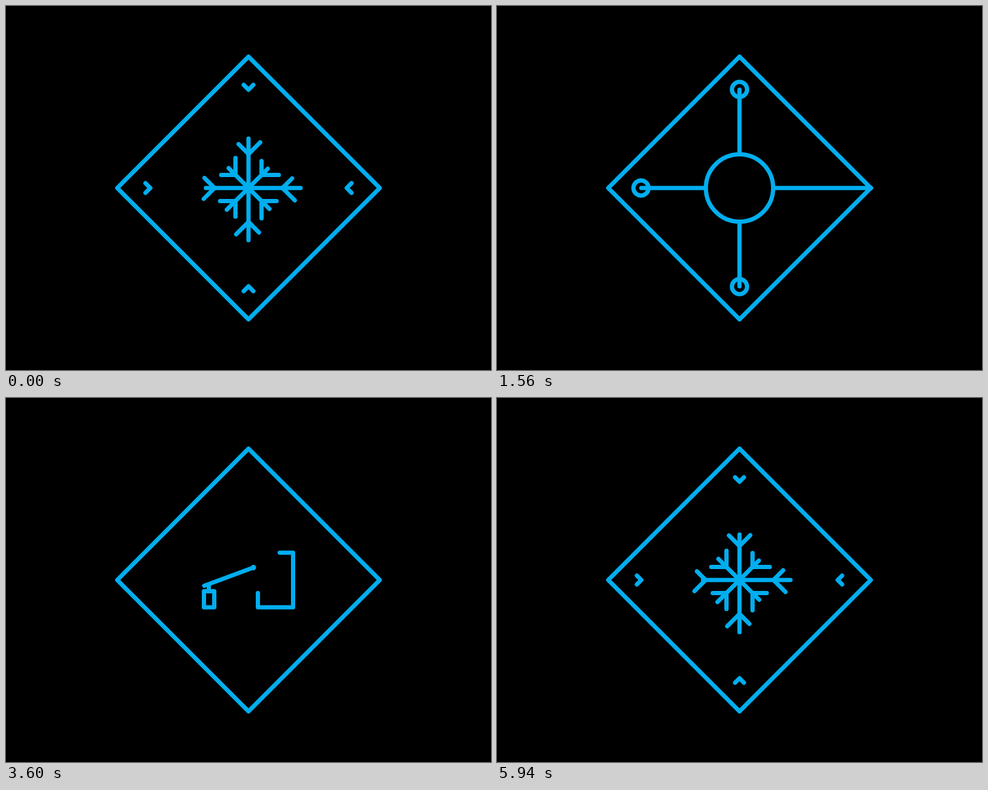
An HTML page with a canvas for the animation above (5970 ms loop, 800 px wide and 600 px high).

```html
<!DOCTYPE html>
<html lang="en">
<head>
<meta charset="utf-8">
<title>Diamond icons</title>
<style>
  html, body { margin: 0; height: 100%; overflow: hidden; background: #000; }
  canvas { display: block; }
</style>
</head>
<body>
<canvas id="stage" width="800" height="600"></canvas>
<script>
const ctx = document.getElementById('stage').getContext('2d');
const LOOP = 5970;

// Sine ease from 0 to 1, starting at `start` and lasting `span` ms
const ease = (t, start, span) => {
  const x = Math.min(1, Math.max(0, (t - start) / span));
  return (1 - Math.cos(Math.PI * x)) / 2;
};

function path(points, closed) {
  ctx.beginPath();
  points.forEach(([x, y]) => ctx.lineTo(x, y));
  if (closed) ctx.closePath();
  ctx.stroke();
}

function ring(x, y, r) {
  if (r < 0.05) return;
  ctx.beginPath();
  ctx.arc(x, y, r, 0, 2 * Math.PI);
  ctx.stroke();
}

// The part of a segment between fractions a and b
function part(x1, y1, x2, y2, a, b) {
  if (b - a < 0.001) return;
  const at = f => [x1 + (x2 - x1) * f, y1 + (y2 - y1) * f];
  path([at(a), at(b)]);
}

// Draws in a frame centred on the stage whose x axis points along a quarter turn
function turned(quarter, draw) {
  ctx.save();
  ctx.translate(400, 300);
  ctx.rotate(quarter * Math.PI / 2);
  draw();
  ctx.restore();
}

// Travels inwards, bursts outwards, then wipes from the inside out
function sweep(s, i, lead, leadIn) {
  const enter = s + leadIn - 47 * i;
  const burst = s + lead - 47 * i;
  const wipe = s + lead - 552 - 47 * (i === 3 ? 3.7 : i);
  const growing = s > -600;
  return growing
    ? [ease(wipe, 0, 235), ease(burst, -388, 345)]
    : [1 - ease(enter, -1164, 235), 1 - ease(enter, -1164, 300)];
}

// Springy growth of the secondary branches
function spring(s, i) {
  const a = s + 30 + 47 * (3 - i);
  const decay = Math.exp(-Math.max(0, a - 150) / 300);
  const size = a < -45
    ? ease(a, -250, 205)
    : 1 - 0.07 * Math.cos(2 * Math.PI * (a - 112) / 210) * decay;
  return size * (1 - ease(s, 420 + 47 * i, 170));
}

function snowflake(s) {
  // Order: bottom, right, top, left
  for (let i = 0; i < 4; i++) {
    turned(1 - i, () => {
      const k = spring(s, i);
      part(0, 0, 86, 0, ...sweep(s, i, 0, 0));
      part(56, 0, 76.3, 20.3, ...sweep(s, i, 0, 26));
      part(56, 0, 73, -17, 0, k);

      // Diagonal arm one eighth of a turn back
      const d = 21.5;
      part(0, 0, 34, -34, 0, k);
      part(d, -d, d, -d - 24.5, 0, k);
      part(d, -d, 50, -d, ...sweep(s, i, 24, 48));
    });
  }
}

function chevrons(s) {
  // Order: right, bottom, left, top
  [8, 0, 25, -15].forEach((lead, q) => {
    const size = 8.5 * (s < -600
      ? ease(s + lead, -1170, 300)
      : s < -300
        ? 1 - ease(s, -600, 250)
        : ease(s, -300, 360) * (1 - ease(s, 680, 280)));
    if (size < 0.05) return;
    turned(q, () => path([[162 + size, -size], [162, 0], [162 + size, size]]));
  });
}

function hub(t) {
  const pop = 1 + 0.06 * Math.sin(Math.PI * ease(t, 1150, 250));
  ring(400, 300, 55.5 * ease(t, 960, 220) * pop * (1 - ease(t, 2050, 320)));

  const knob = (14.5 * ease(t, 1150, 200) - 2 * ease(t, 1360, 170)) * (1 - ease(t, 1600, 180));
  // Order: right, bottom, left, top
  [1500, 1580, 1565, 1605].forEach((end, q) => {
    const far = q ? 162 : 217;
    const start = q ? 1200 : 1080;
    const near = far + (56 - far) * ease(t, start, end - start);
    const outer = far + (55.5 - far) * ease(t, 1650, 450);
    turned(q, () => {
      if (t > start && outer - near > 0.1) path([[near, 0], [outer, 0]]);
      if (q) ring(162.5, 0, knob);
    });
  });
}

function machine(t) {
  const u = t < 3315 ? t : 6630 - t; // the second half mirrors the first
  const mix = (a, b, f) => a + (b - a) * f;

  const rise = ease(u, 2430, 110);
  if (rise > 0.01) {
    const top = 345 - 26.5 * rise;
    path([[326.5, 345], [326.5, top], [343.5, top], [343.5, 345]], true);
  }

  const neck = ease(u, 2510, 80);
  if (neck > 0.01) {
    path([[334.5, 318], [334.5, mix(318, 309, neck)]]);
    const arm = ease(u, 2630, 330);
    path([
      [mix(334.7 - 4.2 * neck, 327, arm), mix(307, 309.5, arm)],
      [mix(334.7 + 4.2 * neck, 408, arm), mix(307, 279.5, arm)]
    ]);
  }

  const drawn = ease(u, 2720, 290);
  if (drawn > 0.01) {
    ctx.setLineDash([193.5 * drawn, 400]);
    path([[451.5, 255], [473.5, 255], [473.5, 345], [415.5, 345], [415.5, 321.5]]);
    ctx.setLineDash([]);
  }

  ring(408, 279.5, 25 * ease(u, 3003, 200));
}

function render(now) {
  const t = now % LOOP;
  ctx.fillStyle = '#000';
  ctx.fillRect(0, 0, 800, 600);
  ctx.strokeStyle = '#00aeef';
  ctx.lineWidth = 7;
  ctx.lineCap = ctx.lineJoin = 'round';

  path([[400, 83.5], [616.5, 300], [400, 516.5], [183.5, 300]], true);

  if (t < 1100 || t > 4700) {
    const s = t > 4700 ? t - LOOP : t; // the snowflake spans the loop point
    snowflake(s);
    chevrons(s);
  }
  if (t > 950 && t < 2400) hub(t);
  if (t > 2400 && t < 4250) machine(t);
}

const begin = performance.now();
function tick() {
  render(performance.now() - begin);
  requestAnimationFrame(tick);
}
tick();
</script>
</body>
</html>
```
